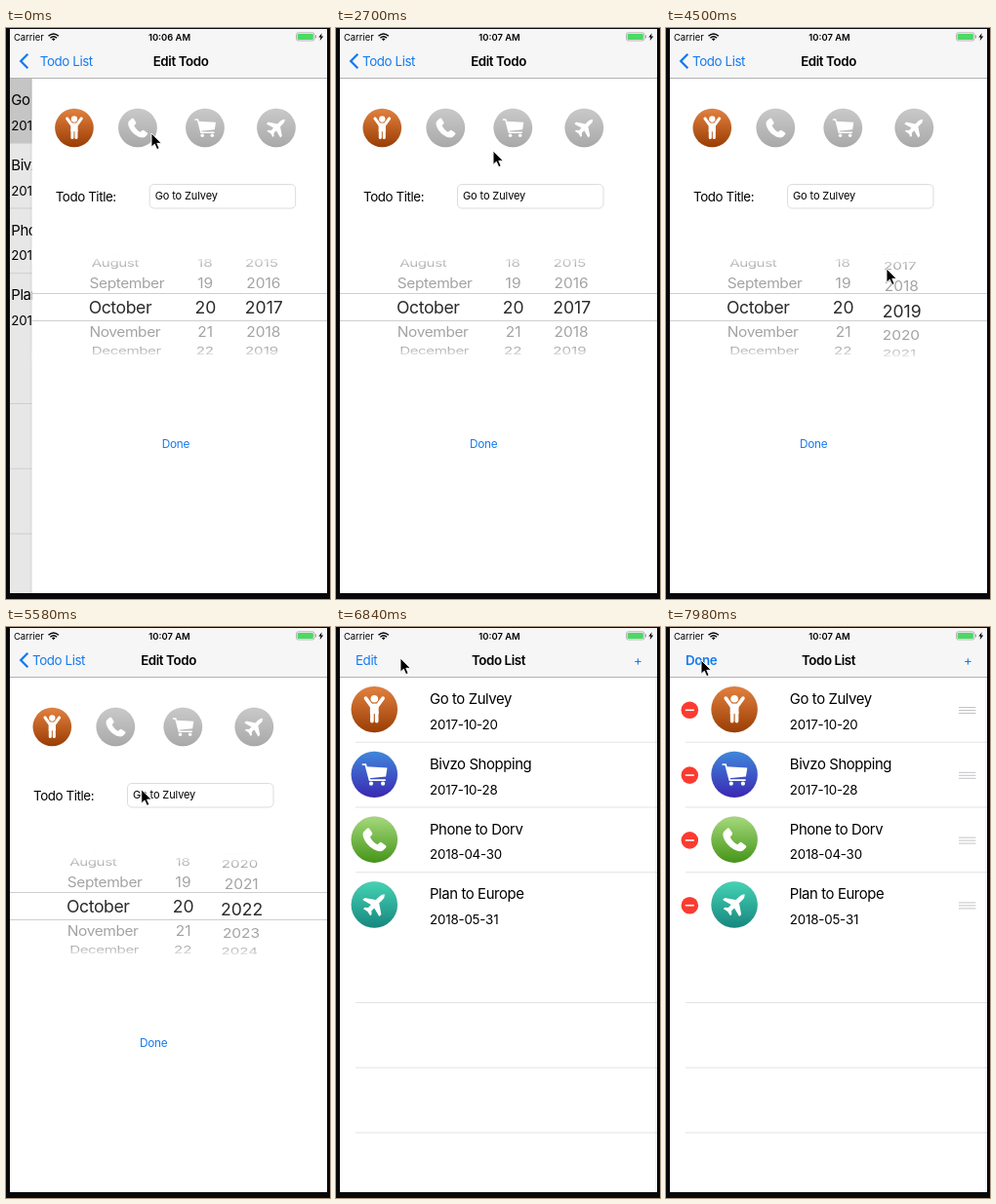
These frames come from a looping animation (332 by 586 pixels, 8000 ms). An HTML page:

```html
<!DOCTYPE html>
<html lang="en">
<head>
<meta charset="utf-8">
<title>Todo app</title>
<style>
html, body { margin: 0; width: 100%; height: 100%; overflow: hidden; background: #08080b; }
svg { display: block; width: 332px; height: 586px; }
text { font-family: Inter, Roboto, sans-serif; font-size: 13.35px; letter-spacing: -.4px; fill: #000; white-space: pre; }
.mid { text-anchor: middle; }
.bold { font-weight: 600; }
.blue { fill: #147af0; }
.status { font-size: 9.4px; letter-spacing: 0; }
.name { font-size: 14.9px; }
.date { font-size: 13.35px; letter-spacing: -.2px; }
.field { font-size: 11px; letter-spacing: -.12px; }
.button { font-size: 11.8px; letter-spacing: -.25px; }
.big text { font-size: 17.6px; fill: #2a2a2c; }
.small text { font-size: 15.6px; }
.wheel .mid { letter-spacing: 0; }
</style>
</head>
<body>
<svg id="stage" viewBox="0 0 332 586"></svg>
<script>
const LOOP = 8000, WIDTH = 325, PITCH = 66.8;
const POP = 5930, EDIT = 7400;

const GLYPHS = {
  person: `<circle cy="-10.8" r="3.8"/><path d="M-4.4-6h8.8V4.5h-8.8z"/>
    <path d="M-8.8-11.5-3.4-4M8.8-11.5 3.4-4M-2.4 3V12M2.4 3V12" fill="none" stroke="#fff" stroke-width="3.7" stroke-linecap="round"/>`,
  phone: `<path d="M-11-8-7.5-11.5Q-6-12.5-5-11.3L-2.2-7Q-1.6-5.7-2.6-4.7L-4.4-2.8Q-1.5 3 3.2 5L5.2 3.2Q6.3 2.2 7.5 3L11.7 6Q12.8 7 11.8 8.2L9 11C5 14-3 9.5-7 4.8-10.5 1-13-5-11-8z"/>`,
  cart: `<path d="M-8-8.2 13.2-7 11.8 2.2-5.5 3.8z"/><circle cx="-3.3" cy="9.3" r="2.1"/><circle cx="8.8" cy="9.3" r="2.1"/>
    <path d="M-12.5-10.3H-9L-4.8 5.8H11.5" fill="none" stroke="#fff" stroke-width="1.8"/>`,
  plane: `<path transform="rotate(45)" d="M0-15Q2.4-13 2.4-9V-4.5L12 2V5L2.4 2.4V6.5L5 9V11L0 9.8-5 11V9L-2.4 6.5V2.4L-12 5V2L-2.4-4.5V-9Q-2.4-13 0-15z"/>`
};
const COLORS = {
  orange: ['#e2813f', '#9a3d04'], blue: ['#4088dc', '#3a27b2'], green: ['#a5d97c', '#459518'],
  teal: ['#45d3b4', '#17877f'], gray: ['#c9c9c9', '#a9a9a9']
};
const TODOS = [
  ['Go to Zulvey', '2017-10-20', 'person', 'orange'],
  ['Bivzo Shopping', '2017-10-28', 'cart', 'blue'],
  ['Phone to Dorv', '2018-04-30', 'phone', 'green'],
  ['Plan to Europe', '2018-05-31', 'plane', 'teal']
];
const MONTHS = ['July', 'August', 'September', 'October', 'November', 'December', 'January'];

const text = (x, y, str, cls = '', id = '') => `<text x="${x}" y="${y}" class="${cls}" id="${id}">${str}</text>`;
const rect = (x, y, w, h, fill, more = '') => `<rect x="${x}" y="${y}" width="${w}" height="${h}" fill="${fill}" ${more}/>`;
const icon = (x, y, r, glyph, color) => `<g transform="translate(${x} ${y}) scale(${r / 24})" fill="#fff">
  <circle r="23.7" fill="url(#${color})" stroke="#000" stroke-opacity=".12" stroke-width=".6"/>${GLYPHS[glyph]}</g>`;
const clip = (id, ...boxes) => `<clipPath id="${id}">${boxes.map(b => rect(...b)).join('')}</clipPath>`;
const gradient = (id, a, b) => `<linearGradient id="${id}" x2="0" y2="1">
  <stop stop-color="${a}"/><stop offset="1" stop-color="${b}"/></linearGradient>`;

const gradients = Object.entries(COLORS).map(([id, [a, b]]) => gradient(id, a, b)).join('')
  + gradient('fadeTop', '#fff', '#fff0') + gradient('fadeBottom', '#fff0', '#fff');

const rowContent = TODOS.map(([name, date, glyph, color], i) => {
  const y = i * PITCH;
  return icon(39.3, 84.6 + y, 24, glyph, color) + text(96, 79 + y, name, 'name') + text(96, 104.8 + y, date, 'date');
}).join('');

const minuses = TODOS.map((_, i) => `<g transform="translate(24.3 ${85.3 + i * PITCH})">
  <circle r="8.8" fill="#fb3b30"/>${rect(-4.5, -.8, 9, 1.6, '#fff')}</g>`).join('');

const grips = TODOS.map((_, i) => [-3, 0, 3].map(d =>
  rect(300, 85 + d + i * PITCH, 17.5, 1, '#c3c3c7')).join('')).join('');

const rules = [1, 2, 3, 5, 6, 7].map(i => rect(20, 51 + i * PITCH, 309, .8, '#dcdcdf')).join('');

const listView = `<g id="list">${rect(4, 52, WIDTH, 528, '#fff')}
  ${rect(4, 52, WIDTH, 66, '#d9d9d9', 'id="selected"')}${rules}
  <g id="rows">${rowContent}</g><g id="minuses">${minuses}</g><g id="grips">${grips}</g></g>`;

const editView = `<g id="edit">${rect(2, 52, 2, 528, '#000', 'opacity=".04"')}${rect(4, 52, WIDTH, 528, '#fff')}
  ${icon(47.3, 102.5, 20, 'person', 'orange')}${icon(112.3, 102.5, 20, 'phone', 'gray')}
  ${icon(181.3, 102.5, 20, 'cart', 'gray')}${icon(254.3, 102.5, 20, 'plane', 'gray')}
  ${text(28, 177.5, 'Todo Title:')}
  ${rect(124.5, 160.5, 149.5, 24.5, '#fff', 'rx="4.5" stroke="#dcdcdc"')}
  ${text(130, 176.3, TODOS[0][0], 'field')}
  <g class="wheel"><g clip-path="url(#around)" class="small" id="small"></g>
  <g clip-path="url(#band)" class="big" id="big"></g></g>
  ${rect(4, 231, WIDTH, 15, 'url(#fadeTop)')}${rect(4, 327, WIDTH, 15, 'url(#fadeBottom)')}
  ${rect(4, 272, WIDTH, 1, '#cfcfd1')}${rect(4, 300, WIDTH, 1, '#cfcfd1')}
  ${text(137, 431, 'Done', 'button blue')}</g>`;

const navBar = `${rect(4, 1, WIDTH, 51, '#f6f6f7')}${rect(4, 51, WIDTH, 1, '#b2b2b4')}
  ${text(8, 12.6, 'Carrier', 'status')}${text(167.5, 12.6, '', 'status bold mid', 'clock')}
  <g fill="none" stroke="#000" stroke-width="1.5"><path d="M43.5 8.3Q48.7 3.6 53.9 8.3M45.4 10.2Q48.7 7.2 52 10.2"/></g>
  <path d="M46.9 11.3Q48.7 9.9 50.5 11.3L48.7 13.2z"/>
  ${rect(297.5, 4.8, 18.5, 8.2, 'none', 'rx="2" stroke="#9b9b9b" stroke-width=".7"')}
  ${rect(298.6, 5.9, 16.3, 6, '#4cd964', 'rx="1"')}${rect(316.8, 7.4, 1.1, 3, '#9b9b9b')}
  <path d="M323.7 5.2 320.3 9.6H322.5L321.7 13 325.2 8.4H323z"/>
  <path id="chevron" d="M22.3 26.8 15.2 34 22.3 41.2" fill="none" stroke="#147af0" stroke-width="2.3"/>
  ${text(27, 38.8, 'Todo List', 'blue', 'back')}
  ${text(166.5, 38.8, 'Edit Todo', 'bold mid', 'editTitle')}
  ${text(166.5, 38.8, 'Todo List', 'bold mid', 'listTitle')}
  <g id="tools">${text(20, 38.8, 'Edit', 'blue', 'toggle')}${text(309.2, 38.8, '+', 'blue mid')}</g>`;

document.getElementById('stage').innerHTML = `<defs>${gradients}
  ${clip('screen', [4, 1, WIDTH, 579])}${clip('band', [4, 273, WIDTH, 27])}
  ${clip('around', [4, 232, WIDTH, 40], [4, 301, WIDTH, 40])}</defs>
  ${rect(0, 0, 332, 586, '#08080b')}
  <g clip-path="url(#screen)">${listView}${rect(4, 52, WIDTH, 528, '#000', 'id="dim"')}${editView}${navBar}</g>
  <path id="cursor" d="M0 0V14.2L3.3 11.2 5.7 16.6 8.1 15.6 5.8 10.3H10.3z" fill="#000" stroke="#fff" stroke-width=".9"/>`;

const el = {};
document.querySelectorAll('[id]').forEach(n => el[n.id] = n);
const move = (n, x, y = 0) => n.setAttribute('transform', `translate(${x.toFixed(2)} ${y.toFixed(2)})`);
const fade = (n, o) => n.setAttribute('opacity', o.toFixed(3));
const clamp = v => Math.max(0, Math.min(1, v));
const smooth = u => u * u * (3 - 2 * u);

// Critically damped settle, from 1 down to 0
const settle = ms => {
  if (ms <= 0) return 1;
  const s = ms / 65, v = (1 + s) * Math.exp(-s);
  return v < .0008 ? 0 : v;
};

// Pointer stops: time, x, y
const PATH = [
  [0, 149, 108], [250, 149, 108], [1080, 117, 113], [1400, 117, 113], [2700, 161, 126], [3900, 230, 296],
  [4180, 229, 297], [4500, 226, 247], [4750, 225, 243], [5200, 212, 231], [5580, 139, 167], [5860, 42, 34],
  [6300, 42, 33], [6840, 66, 32], [7300, 36, 34], [8000, 36, 34]
];

// Monotone cubic interpolation along one axis
function along(t, axis) {
  const slope = i => (PATH[i + 1][axis] - PATH[i][axis]) / (PATH[i + 1][0] - PATH[i][0]);
  const tangent = i => {
    if (i < 1 || i > PATH.length - 2) return 0;
    const a = slope(i - 1), b = slope(i);
    return a * b > 0 ? 2 * a * b / (a + b) : 0;
  };
  let i = 0;
  while (i < PATH.length - 2 && t >= PATH[i + 1][0]) i++;
  const [p, q] = [PATH[i], PATH[i + 1]], d = q[0] - p[0], u = (t - p[0]) / d;
  return p[axis] + (q[axis] - p[axis]) * smooth(u) + d * u * (1 - u) * ((1 - u) * tangent(i) - u * tangent(i + 1));
}

// Drag, then coast to rest
function yearAt(t) {
  if (t < 4180) return 2017;
  if (t < 4500) return 2017 + 1.85 * ((t - 4180) / 320) ** 2;
  return 2022 - 3.15 * Math.exp(-(t - 4500) / 313);
}

function column(pos, x, cls, label, big) {
  let out = '';
  for (let i = Math.round(pos) - 3; i <= Math.round(pos) + 3; i++) {
    const a = (i - pos) * .45, c = Math.cos(a);
    if (c < .12) continue;
    const y = 286.6 + 57.4 * Math.sin(a), s = 1 - .08 * (1 - c);
    out += `<g transform="translate(166 ${y.toFixed(2)}) scale(${s.toFixed(4)} ${c.toFixed(4)})" opacity="${big ? 1 : .36}">
      ${text(x - 166, big ? 6.4 : 5.7, label(i), cls)}</g>`;
  }
  return out;
}

let shownYear;
function drawWheel(year) {
  if (year === shownYear) return;
  shownYear = year;
  for (const big of [false, true]) {
    el[big ? 'big' : 'small'].innerHTML = column(3, 62, '', i => MONTHS[i] || '', big)
      + column(20, 181.7, 'mid', String, big) + column(year, 241.7, 'mid', String, big);
  }
}

function draw(t) {
  // k: 0 shows the edit view, 1 shows the list
  const k = t < POP ? settle(t + 281) : 1 - settle(t - POP);
  move(el.edit, WIDTH * k);
  move(el.list, -97.5 * (1 - k));
  fade(el.dim, .1 * (1 - k));
  fade(el.selected, t < POP ? 1 : 1 - k);

  const late = clamp((k - .3) / .7);
  move(el.editTitle, 180 * k);
  fade(el.editTitle, clamp(1 - k * k * 1.4));
  move(el.back, 111 * k);
  fade(el.back, clamp(1 - k * k * 2));
  move(el.listTitle, -111 * (1 - k));
  fade(el.listTitle, late);
  fade(el.chevron, clamp(1 - k * k));
  fade(el.tools, late);

  const e = smooth(clamp((t - EDIT) / 300)), editing = t >= EDIT;
  move(el.rows, 30.8 * e);
  move(el.minuses, -31 * (1 - e));
  fade(el.minuses, e);
  fade(el.grips, e);
  el.toggle.textContent = editing ? 'Done' : 'Edit';
  el.toggle.setAttribute('class', editing ? 'blue bold' : 'blue');
  el.clock.textContent = t < 480 ? '10:06 AM' : '10:07 AM';

  drawWheel(yearAt(t));
  move(el.cursor, along(t, 1), along(t, 2));
}

const start = performance.now();
function tick() {
  draw((performance.now() - start) % LOOP);
  requestAnimationFrame(tick);
}
tick();
</script>
</body>
</html>
```
